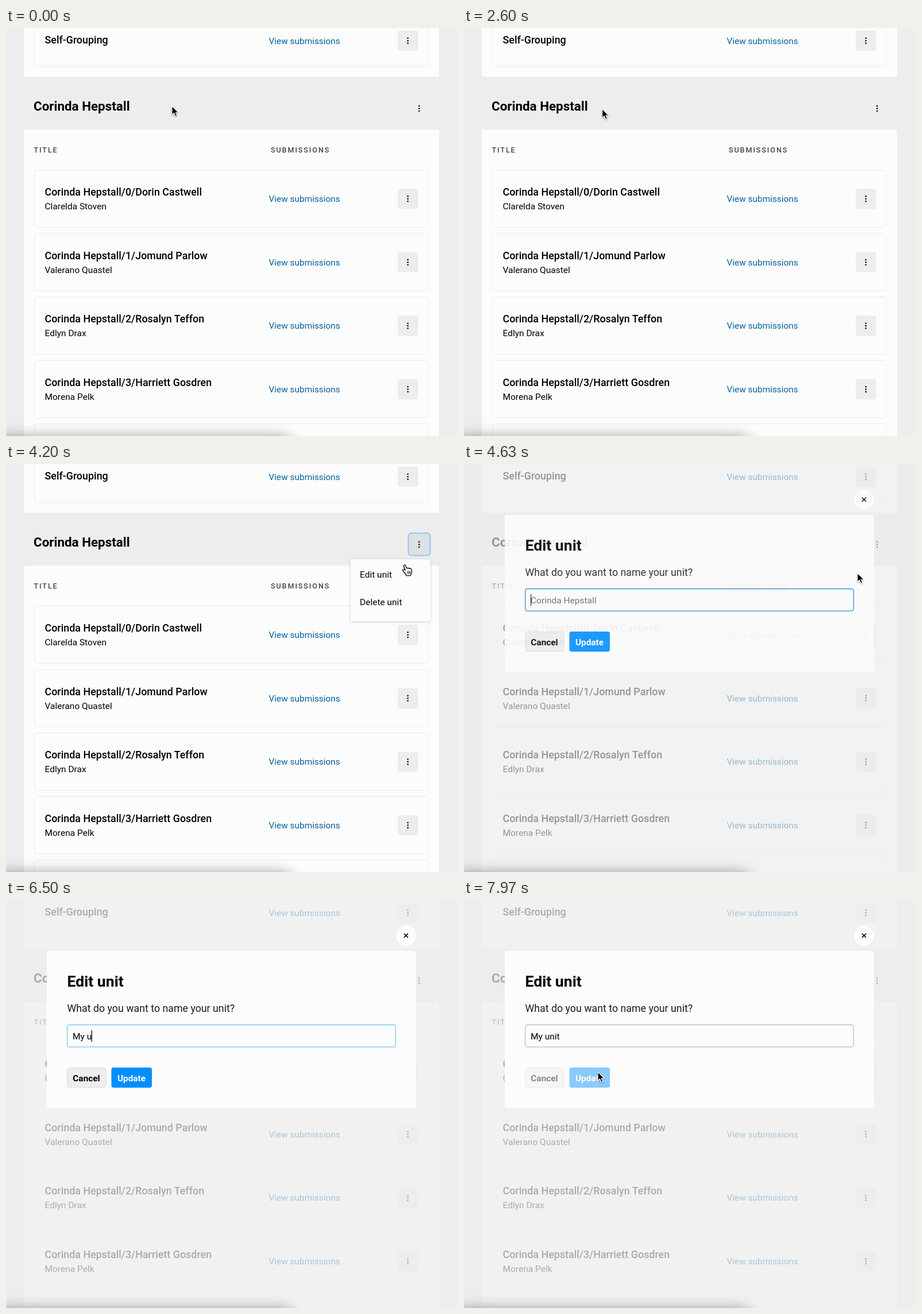
Recreate the animation shown at these times as an HTML page. Size 787 by 711 pixels, loop 8000 ms.

```html
<!DOCTYPE html>
<html lang="en">
<head>
<meta charset="utf-8">
<title>Edit unit</title>
<style>
  html, body { margin: 0; width: 100%; height: 100%; overflow: hidden; background: #ededef; }
  svg { display: block; width: 787px; height: 711px; font-family: Roboto, Inter, sans-serif; }
  text { white-space: pre; }
  .card { fill: #fcfcfc; }
  .row { fill: none; stroke: #ececed; }
  .title { font-size: 17.9px; font-weight: 500; }
  .body { font-size: 15.5px; }
  .link { font-size: 15.4px; fill: #04609f; }
  .label { font-size: 12.6px; font-weight: 500; letter-spacing: 1.9px; fill: #444; }
  .heading { font-size: 22.4px; font-weight: 600; }
  .button { font-size: 15.4px; font-weight: 600; text-anchor: middle; }
  #cursor { filter: drop-shadow(0 1px 1px #0006); }
  #cursor path { stroke-linejoin: round; stroke-linecap: round; }
</style>
</head>
<body>
<svg viewBox="0 0 787 711">
  <defs>
    <filter id="blur" filterUnits="userSpaceOnUse" x="-100" y="640" width="800" height="260">
      <feGaussianBlur stdDeviation="13"/>
    </filter>
    <filter id="lift" x="-10%" y="-10%" width="120%" height="125%">
      <feDropShadow dx="0" dy="1" stdDeviation="2" flood-opacity=".18"/>
    </filter>
  </defs>
  <rect width="787" height="711" fill="#ededef"/>
  <g id="page"></g>
  <g id="menu">
    <rect x="600" y="166" width="139" height="108" rx="4" fill="#fcfcfc" filter="url(#lift)"/>
    <text class="body" x="616" y="198">Edit unit</text>
    <text class="body" x="616" y="246">Delete unit</text>
  </g>
  <rect id="overlay" width="787" height="711" fill="#ededed"/>
  <g id="modal">
    <circle class="card" cx="696.5" cy="62" r="17.7"/>
    <path d="M693 58.5l7 7m0-7l-7 7" stroke="#222" stroke-width="1.8"/>
    <rect class="card" x="71" y="88.5" width="643" height="274" rx="4"/>
    <text x="106.5" y="151" font-size="26.6" font-weight="600">Edit unit</text>
    <text x="106.5" y="194.5" font-size="17.8" fill="#1c1c1c">What do you want to name your unit?</text>
    <rect id="field" x="106.6" y="217.5" width="571.8" height="38.6" rx="4" fill="#fcfcfc" stroke-width="1.3"/>
    <text id="value" class="body" x="116" y="242.5"></text>
    <rect id="caret" y="227" width="1.2" height="20"/>
    <g id="actions">
      <rect x="106.5" y="292.5" width="67.5" height="34" rx="4" fill="#ededee" stroke="#dcdcde"/>
      <text class="button" x="140" y="315.5">Cancel</text>
      <rect x="183.5" y="292" width="70.5" height="35" rx="4" fill="#008eff"/>
      <text class="button" x="218.5" y="315.5" fill="#fff">Update</text>
    </g>
  </g>
  <rect x="-20" y="714" width="520" height="140" rx="20" opacity=".44" filter="url(#blur)"/>
  <g id="cursor" stroke="#fff">
    <path id="arrow" stroke-width="1.1" d="M0 0V15.4L3.6 12.1L6.1 18L8.8 16.8L6.4 11.2H11Z"/>
    <g id="hand">
      <path fill="#fff" stroke="#000" stroke-width="1.2" d="M1.2 .8C.2-1-2.3 0-1.6 2L1 9.2L-1.2 7.8C-2.8 7-4.2 8.6-3 10L1.8 15.6L2.6 18H10L11.6 13.6C12.6 10.8 12 8 10.8 6.6C10 5.6 8.6 5.8 8.4 6.6C7.8 5 6 5 5.6 6C4.8 4.8 3.4 4.8 3 5.6Z"/>
      <path fill="none" stroke="#000" d="M4.6 11l.9 4M7 10.8l.4 4M9.2 10.6l.2 4"/>
    </g>
    <g id="ibeam" fill="none">
      <path stroke-width="2.6" d="M-3.5-8Q0-8 0-5.5Q0-8 3.5-8M0-6V6M-3.5 8Q0 8 0 5.5Q0 8 3.5 8M-2 3H2"/>
      <path stroke="#000" stroke-width="1.2" d="M-3.5-8Q0-8 0-5.5Q0-8 3.5-8M0-6V6M-3.5 8Q0 8 0 5.5Q0 8 3.5 8M-2 3H2"/>
    </g>
  </g>
</svg>
<script>
const LOOP = 8000;
const UNIT = 'Corinda Hepstall';
const MEMBERS = [
  ['Dorin Castwell', 'Clarelda Stoven'],
  ['Jomund Parlow', 'Valerano Quastel'],
  ['Rosalyn Teffon', 'Edlyn Drax'],
  ['Harriett Gosdren', 'Morena Pelk'],
];
const $ = id => document.getElementById(id);

// Page
const dots = (x, y) => [-4.4, 0, 4.4].map(d => `<circle cx="${x}" cy="${y + d}" r="1.3"/>`).join('');
const text = (kind, x, y, s) => `<text class="${kind}" x="${x}" y="${y}">${s}</text>`;
const frame = (y, height = 100) => `<rect class="row" x="49.5" y="${y}" width="686" height="${height}" rx="4"/>`;
const controls = middle => `
  ${text('link', 457.5, middle + 5.4, 'View submissions')}
  <rect x="682" y="${middle - 17.7}" width="35.5" height="35.5" rx="4" fill="#ededee"/>
  ${dots(699.7, middle)}`;
const rowY = i => 247.5 + 110.6 * i;
const member = ([name, owner], i) => `
  ${frame(rowY(i))}
  ${text('title', 67.5, rowY(i) + 44.5, `${UNIT}/${i}/${name}`)}
  ${text('body', 67.5, rowY(i) + 68.6, owner)}
  ${controls(rowY(i) + 50.2)}`;

$('page').innerHTML = `
  <rect class="card" x="31" y="-20" width="723" height="105" rx="4"/>
  ${frame(-33)}
  ${text('title', 67.5, 26.5, 'Self-Grouping')}
  ${controls(22.2)}
  ${text('heading', 48, 144, UNIT)}
  <rect id="focus" x="700.5" y="120.5" width="38" height="39" rx="5" fill="#dfe0e2" stroke="#8fc8f8" stroke-width="2"/>
  ${dots(719.3, 140.3)}
  <rect class="card" x="31" y="177" width="723" height="560" rx="4"/>
  ${text('label', 48.5, 216.5, 'TITLE')}
  ${text('label', 461, 216.5, 'SUBMISSIONS')}
  ${MEMBERS.map(member).join('')}
  ${frame(rowY(4))}`;

// Timeline: [time, ...values]
const POINTER = [
  [0, 289, 136], [970, 289, 136], [1300, 244, 128], [1570, 213, 129.5], [1800, 180, 136],
  [2150, 130, 140], [2600, 240, 141], [3000, 560, 140], [3330, 720, 137.3], [3870, 720, 137.3],
  [4370, 685, 190], [4640, 685, 190], [5000, 490, 212], [5370, 340, 217], [7200, 340, 217],
  [7370, 286, 267], [7700, 233, 299.5], [LOOP, 233, 299.5],
];
const SHAPES = [
  [0, 'arrow'], [3250, 'hand'], [4550, 'arrow'], [5310, 'ibeam'], [5800, ''],
  [7200, 'ibeam'], [7240, 'arrow'], [7620, 'hand'], [7850, 'arrow'],
];
const BORDER = [
  [0, 27, 135, 220], [5370, 27, 135, 220], [5530, 124, 196, 242], [7220, 124, 196, 242],
  [7370, 27, 135, 220], [7830, 27, 135, 220], [7950, 190, 190, 190], [LOOP, 190, 190, 190],
];
const TYPED = 'My unit';
const KEYSTROKES = [5800, 6000, 6300, 6500, 6730, 6870, 7000];
const SUBMIT = 7840;

const ramp = (t, from, length) => Math.min(1, Math.max(0, (t - from) / length));
const easeOut = p => 1 - (1 - p) ** 3;
const segment = (keys, t) => keys.findLastIndex(k => k[0] <= t);

function mix(keys, t) {
  const i = segment(keys, t), a = keys[i], b = keys[i + 1] || a;
  const p = ramp(t, a[0], b[0] - a[0] || 1);
  return a.slice(1).map((v, n) => v + (b[n + 1] - v) * p);
}

// Hermite curve that comes to rest where a key repeats its neighbour
function glide(keys, t) {
  const i = segment(keys, t), a = keys[i], b = keys[i + 1] || a;
  const span = b[0] - a[0] || 1, p = ramp(t, a[0], span);
  const slope = (k, n) => {
    const before = keys[k - 1], after = keys[k + 1];
    if (!before || !after || before[n] === keys[k][n] || after[n] === keys[k][n]) return 0;
    return (after[n] - before[n]) / (after[0] - before[0]);
  };
  return [1, 2].map(n =>
    a[n] + (b[n] - a[n]) * p * p * (3 - 2 * p)
    + span * p * (1 - p) * (slope(i, n) * (1 - p) - slope(i + 1, n) * p));
}

function draw(t) {
  const shown = easeOut(ramp(t, 4530, 200));
  $('overlay').setAttribute('opacity', .72 * shown);
  $('modal').setAttribute('opacity', shown);
  $('focus').setAttribute('opacity', t >= 3470 && t < 4560 ? 1 : 0);
  $('menu').setAttribute('opacity', ramp(t, 3510, 120) * (1 - ramp(t, 4510, 80)));

  const count = KEYSTROKES.filter(k => k <= t).length;
  $('value').textContent = count ? TYPED.slice(0, count) : UNIT;
  $('value').setAttribute('fill', count ? '#000' : '#666');
  $('caret').setAttribute('x', 116 + (count ? $('value').getComputedTextLength() - .5 : 0));
  $('caret').setAttribute('opacity', t < SUBMIT ? 1 : 0);
  $('field').setAttribute('stroke', `rgb(${mix(BORDER, t).map(Math.round)})`);
  $('actions').setAttribute('opacity', 1 - .55 * ramp(t, SUBMIT, 120));

  const shape = SHAPES[segment(SHAPES, t)][1];
  for (const id of ['arrow', 'hand', 'ibeam']) $(id).setAttribute('display', id === shape ? 'inline' : 'none');
  $('cursor').setAttribute('transform', `translate(${glide(POINTER, t)})`);
}

const start = performance.now();
function tick() {
  draw((performance.now() - start) % LOOP);
  requestAnimationFrame(tick);
}
tick();
</script>
</body>
</html>
```
